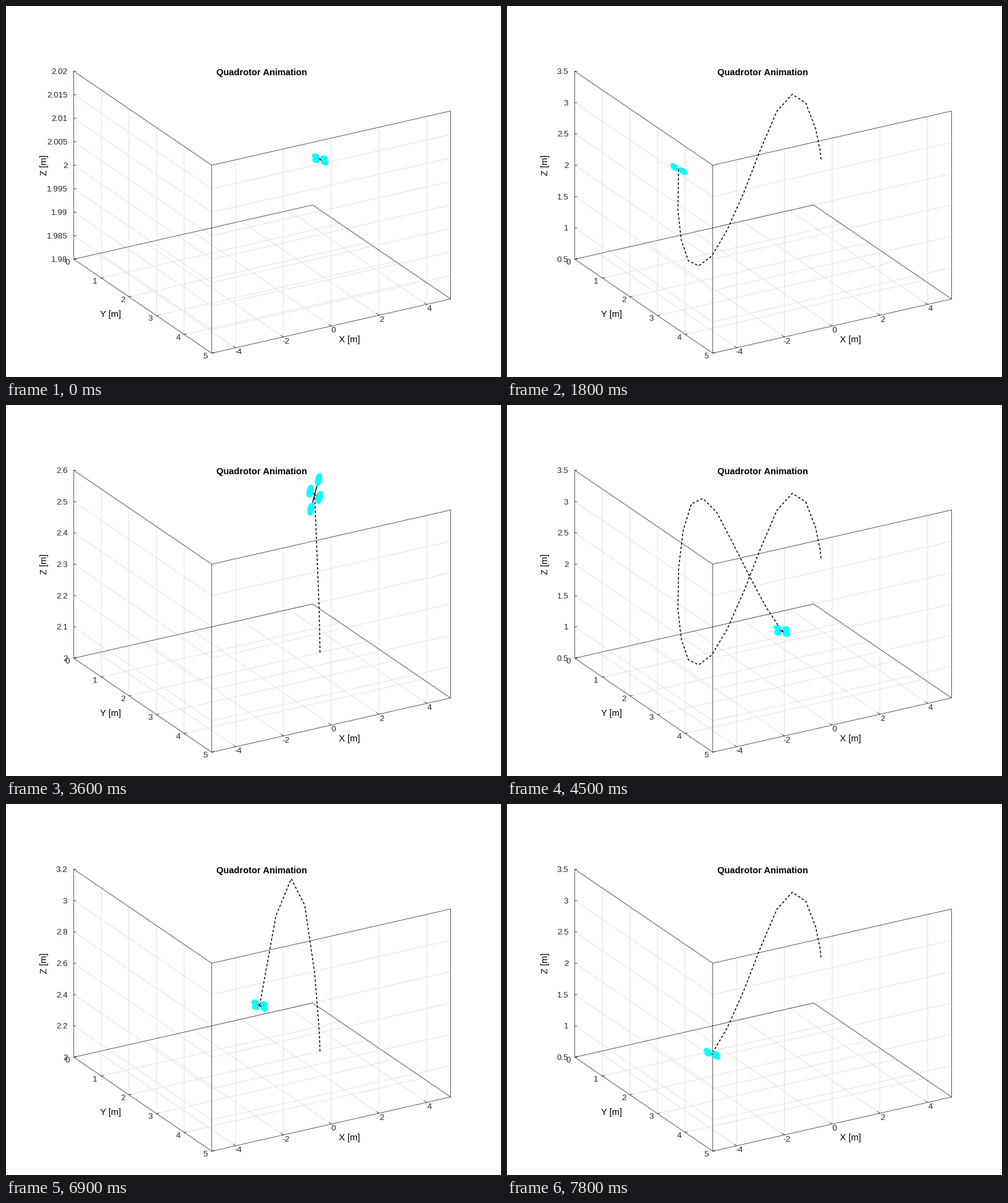
A matplotlib script for the animation above (8.1 s loop, 800 by 600 pixels).

```python
import math

import matplotlib.pyplot as plt
import numpy as np
from matplotlib.animation import FuncAnimation

PX = 0.72           # one pixel in points at 100 dpi
STEPS = 27
DT = 0.3            # simulated seconds per step
OMEGA = 2 * math.pi / 8
ARM, ROTOR = 0.168, 0.05
DARK, GRID = "#262626", "#dfdfdf"
X_TICKS, Y_TICKS = range(-4, 5, 2), range(6)

# Altitude relative to 2 m at every step
CLIMB = np.array([
    0, .134, .508, .955, 1.144, .93, .38, -.25, -.785,
    -1.144, -1.255, -1.135, -.775, -.289, .361, .946, 1.341, 1.387,
    1.11, .57, -.02, -.58, -1.017, -1.185, -1.128, -.852, -.425])

# The stills play in alphabetical order of their numbers: 0, 1, 10, 11, ...
ORDER = sorted(range(STEPS), key=str)


def project(x, y, h):
    """Screen position; h is the height as a share of the z axis."""
    u = np.asarray(x) + 5
    return (109.5 + 38.6 * u + 44.6 * y,
            409.5 - 8.77 * u + 30.4 * y - 304 * h)


def path_x(t):
    """Circular reference plus the lag while the craft gets going."""
    return 3 * np.cos(OMEGA * t) + 0.675 * t**2 * np.exp(-2.37 * t**2)


def tilt_at(k):
    if k == 0:
        return 0.0
    t, e = k * DT, 0.01
    accel = (path_x(t + e) - 2 * path_x(t) + path_x(t - e)) / e**2
    return math.atan(-accel / 9.81)


def z_axis(lo, hi):
    """Automatic limits and tick spacing."""
    if hi == lo:
        return lo * 0.99, hi * 1.01, 0.005
    raw = (hi - lo) / 5
    power = 10 ** math.floor(math.log10(raw))
    b = raw / power
    sep = power * (1 if b < 2**.5 else 2 if b < 10**.5 else 5 if b < 50**.5 else 10)
    return sep * math.floor(lo / sep), sep * math.ceil(hi / sep), sep


def join(segments):
    """Many point lists as one broken line."""
    xs, ys = [], []
    for points in segments:
        for p in points:
            sx, sy = project(*p)
            xs.append(sx)
            ys.append(sy)
        xs.append(np.nan)
        ys.append(np.nan)
    return xs, ys


fig = plt.figure(figsize=(8, 6), dpi=100, facecolor="white")
ax = fig.add_axes([0, 0, 1, 1])
ax.set_xlim(0, 800)
ax.set_ylim(600, 0)
ax.axis("off")


def line(color, width, z, **kw):
    return ax.plot([], [], color=color, lw=width * PX, zorder=z, **kw)[0]


def label(x, y, s, size=13.33, color=DARK, ha="center", **kw):
    kw.setdefault("va", "baseline")
    return ax.text(x, y, s, fontsize=size * PX, color=color, ha=ha,
                   family="Liberation Sans", **kw)


def draw_box():
    grid = [[(x, 0, 0), (x, 5, 0), (x, 5, 1)] for x in X_TICKS]
    grid += [[(5, y, 0), (-5, y, 0), (-5, y, 1)] for y in range(1, 5)]
    line(GRID, 0.9, 1).set_data(*join(grid))

    edges = [[(-5, 0, 0), (5, 0, 0), (5, 5, 0), (-5, 5, 0), (-5, 0, 0)],
             [(-5, 0, 0), (-5, 0, 1), (-5, 5, 1), (5, 5, 1), (5, 5, 0)],
             [(-5, 5, 0), (-5, 5, 1)]]
    edges += [[(x, 5, 0), (x, 4.91, 0)] for x in X_TICKS]
    edges += [[(-5, y, 0), (-4.9, y, 0)] for y in Y_TICKS]
    line(DARK, 0.75, 2).set_data(*join(edges))

    for x in X_TICKS:
        sx, sy = project(x, 5, 0)
        label(sx + 4, sy + 10.7, str(x))
    for y in Y_TICKS:
        sx, sy = project(-5, y, 0)
        label(sx - 10, sy + 8.7, str(y))

    label(555, 544, "X [m]", 14.67, "black")
    label(169, 503, "Y [m]", 14.67, "black")
    label(62, 257, "Z [m]", 14.67, "black", rotation=90, va="center")
    label(413.5, 111.8, "Quadrotor Animation", 14.67, "black", weight="bold")


draw_box()
z_grid = line(GRID, 0.9, 1)
z_marks = line(DARK, 0.75, 2)
z_labels = [label(99.5, 0, "", ha="right") for _ in range(12)]
trail = line("black", 1.5, 4, ls=(0, (2.6, 2.1)), dash_capstyle="butt")
arm_y = line("red", 2, 5)
arm_x = line("black", 1.5, 6)
rotors = [line("cyan", 6, 7, solid_joinstyle="round") for _ in range(4)]


def update(i):
    k = ORDER[i]
    xs = path_x(np.arange(k + 1) * DT)
    zs = 2 + CLIMB[:k + 1]
    x, z = xs[-1], zs[-1]
    tilt = tilt_at(k)
    c, s = math.cos(tilt), math.sin(tilt)

    reach = (ARM + ROTOR) * abs(s)
    lo, hi, sep = z_axis(min(zs.min(), z - reach), max(zs.max(), z + reach))

    def share(v):
        return (v - lo) / (hi - lo)

    def body(a, b):
        """Screen position of a point in the tilted plane of the craft."""
        return project(x + a * c, 2 + b, share(z + a * s))

    ticks = [lo + n * sep for n in range(round((hi - lo) / sep) + 1)]
    z_grid.set_data(*join([(-5, 0, share(v)), (-5, 5, share(v)), (5, 5, share(v))]
                          for v in ticks[1:-1]))
    z_marks.set_data(*join([(-5, 0, share(v)), (-4.9, 0, share(v) - .003)]
                           for v in ticks))
    for n, text in enumerate(z_labels):
        shown = n < len(ticks)
        text.set_text(f"{ticks[n]:.4g}" if shown else "")
        if shown:
            text.set_y(project(-5, 0, share(ticks[n]))[1] + 4.6)

    trail.set_data(*project(xs, 2, share(zs)))
    ends = np.array([-ARM, ARM])
    arm_x.set_data(*body(ends, np.zeros(2)))
    arm_y.set_data(*body(np.zeros(2), ends))
    turn = np.linspace(0, 2 * np.pi, 25)
    hubs = [(-ARM, 0), (ARM, 0), (0, -ARM), (0, ARM)]
    for rotor, (a, b) in zip(rotors, hubs):
        rotor.set_data(*body(a + ROTOR * np.cos(turn), b + ROTOR * np.sin(turn)))
    return [z_grid, z_marks, trail, arm_x, arm_y, *rotors, *z_labels]


anim = FuncAnimation(fig, update, frames=STEPS, interval=300,
                     repeat=True, repeat_delay=0, blit=False)
plt.show()
```
